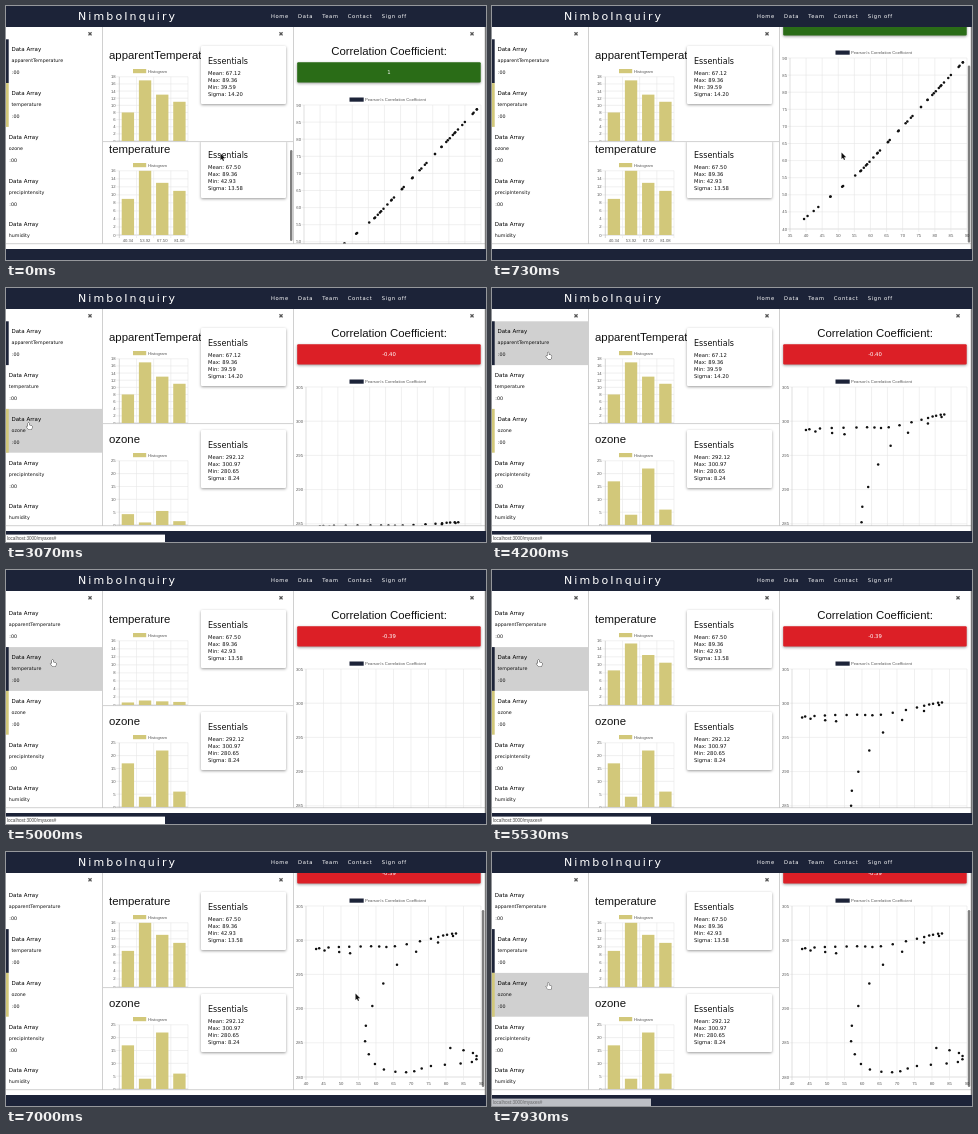
These frames come from a looping animation (480x254 px, 8000 ms). An HTML page with a canvas:

```html
<!DOCTYPE html>
<html lang="en">
<head>
<meta charset="utf-8">
<title>Climate dashboard</title>
<style>
html, body { margin: 0; width: 100%; height: 100%; overflow: hidden; background: #fff; }
canvas { display: block; width: 480px; height: 254px; }
</style>
</head>
<body>
<canvas id="stage"></canvas>
<script>
const LOOP = 8000, W = 480, H = 254;
const NAVY = '#1c2338', KHAKI = '#d2c87a', GREEN = '#2a6c17', RED = '#dc1f26', BORDER = '#c4c4c4';
const WIDE = '"DejaVu Sans", sans-serif', ARIAL = '"Liberation Sans", Arial, sans-serif';
const TOP = 21, BOTTOM = 238, ITEM_TOP = 33.3, ITEM_H = 43.8, CARD_H = 102;

const canvas = document.getElementById('stage');
const ctx = canvas.getContext('2d');
const dpr = window.devicePixelRatio || 1;
canvas.width = W * dpr;
canvas.height = H * dpr;

const items = ['apparentTemperature', 'temperature', 'ozone', 'precipIntensity', 'humidity'];

const series = {
  apparentTemperature: { bars: [8, 17, 13, 11], mean: 67.12, max: 89.36, min: 39.59, sigma: 14.2,
    value: ([t]) => t - 0.25 * Math.max(0, 57 - t) },
  temperature: { bars: [9, 16, 13, 11], mean: 67.5, max: 89.36, min: 42.93, sigma: 13.58,
    value: ([t]) => t },
  ozone: { bars: [17, 4, 22, 6], mean: 292.12, max: 300.97, min: 280.65, sigma: 8.24,
    value: ([, o]) => o }
};

// Every third hour as [temperature, ozone]; the hours between are interpolated
const weather = [
  [52.6, 298.1], [42.9, 298.7], [49.4, 299], [58.6, 299.1], [65.4, 299.1], [75.7, 300.2],
  [80.3, 300.8], [82, 300.6], [66, 296.4], [57.1, 287.5], [59.7, 281.9], [68.6, 280.7],
  [75.7, 281.6], [87.4, 282.2], [87.7, 283.5], [78.5, 284.5]
];
const readings = Array.from({ length: 3 * (weather.length - 1) }, (_, hour) => spline(weather, hour / 3));

const views = [
  { start: 0, cards: ['apparentTemperature', 'temperature'], value: '1', color: GREEN },
  { start: 3002, cards: ['apparentTemperature', 'ozone'], value: '-0.40', color: RED },
  { start: 4983, cards: ['temperature', 'ozone'], value: '-0.39', color: RED }
];

// Moves: start, end, then the values reached
const cursorMoves = [
  [0, 0, 217, 151], [130, 400, 352, 150], [1200, 1530, 188, 200], [1800, 1930, 18, 130],
  [2470, 2800, 23, 138], [3870, 4200, 56.5, 67.5], [4470, 4700, 47, 93],
  [5870, 6130, 352, 145], [7270, 7400, 337, 152], [7600, 7730, 56.5, 134]
];
const scrollMoves = [[0, 0, 0], [330, 730, 47], [2470, 2800, 0], [6130, 6200, 5], [6470, 7000, 45]];

const clamp = v => Math.min(1, Math.max(0, v));
const ramp = (t, a, b) => b > a ? clamp((t - a) / (b - a)) : 1;
const smooth = p => p * p * (3 - 2 * p);
const easeOutQuart = p => 1 - (1 - p) ** 4;

function spline(points, u) {
  const i = Math.floor(u), f = u - i;
  const at = n => points[Math.min(points.length - 1, Math.max(0, n))];
  return [0, 1].map(k => {
    const [a, b, c, d] = [-1, 0, 1, 2].map(n => at(i + n)[k]);
    return b + f / 2 * (c - a + f * (2 * a - 5 * b + 4 * c - d + f * (3 * (b - c) + d - a)));
  });
}

function follow(moves, t) {
  return moves.reduce((now, [a, b, ...goal]) => {
    const p = t < a ? 0 : smooth(ramp(t, a, b));
    return goal.map((v, i) => p === 1 ? v : now[i] + (v - now[i]) * p);
  }, [0, 0]);
}

function rect(x, y, w, h, color) {
  ctx.fillStyle = color;
  ctx.fillRect(x, y, w, h);
}

function line(x1, y1, x2, y2, color = '#e6e6e6', width = 0.6) {
  ctx.strokeStyle = color;
  ctx.lineWidth = width;
  ctx.beginPath();
  ctx.moveTo(x1, y1);
  ctx.lineTo(x2, y2);
  ctx.stroke();
}

function text(str, x, y, size, { font = WIDE, color = '#111', align = 'left', spacing = 0 } = {}) {
  ctx.font = `${size}px ${font}`;
  ctx.letterSpacing = spacing + 'px';
  ctx.fillStyle = color;
  ctx.textAlign = align;
  ctx.fillText(str, x, y);
  return ctx.measureText(str).width;
}

const tickText = (str, x, y, align) => text(str, x, y, 4.2, { font: ARIAL, color: '#555', align });
const closeIcon = x => text('✖', x, 30.2, 6, { align: 'center', color: '#555' });

function clipped(x, y, w, h, dy, draw) {
  ctx.save();
  ctx.beginPath();
  ctx.rect(x, y, w, h);
  ctx.clip();
  ctx.translate(0, dy);
  draw();
  ctx.restore();
}

function shadowBox(x, y, w, h, color) {
  ctx.save();
  ctx.shadowColor = 'rgba(0,0,0,.4)';
  ctx.shadowBlur = 3 * dpr;
  ctx.shadowOffsetY = dpr;
  ctx.fillStyle = color;
  ctx.beginPath();
  ctx.roundRect(x, y, w, h, 1);
  ctx.fill();
  ctx.restore();
}

function thumb(x, y, h, alpha) {
  ctx.fillStyle = `rgba(0,0,0,${0.5 * alpha})`;
  ctx.beginPath();
  ctx.roundRect(x, y, 2.4, h, 1.2);
  ctx.fill();
}

function drawHeader() {
  rect(0, 0, W, TOP, NAVY);
  text('NimboInquiry', 72, 14.3, 11, { color: '#fff', spacing: 2.1 });
  let x = 265;
  for (const name of ['Home', 'Data', 'Team', 'Contact', 'Sign off'])
    x += 9.2 + text(name, x, 12.3, 5.2, { color: '#fff', spacing: 0.65 });
}

function drawList(selected, hovered) {
  closeIcon(84);
  items.forEach((name, i) => {
    const y = ITEM_TOP + i * ITEM_H, slot = selected.indexOf(name);
    if (i === hovered) rect(0, y, 96, ITEM_H, '#d0d0d0');
    if (slot >= 0) rect(0, y, 2.7, ITEM_H, slot ? KHAKI : NAVY);
    const x = slot >= 0 ? 5.5 : 2.8;
    text('Data Array', x, y + 11.8, 5.5, { color: '#000' });
    text(name, x, y + 22.8, 4.75);
    text(':00', x + 0.5, y + 35, 4.75);
  });
}

function drawHistogram({ bars, mean, sigma }, grow) {
  const left = 113.3, right = 182, top = 70.8, base = 135, cat = (right - left) / bars.length;
  const peak = Math.max(...bars), step = peak > 20 ? 5 : 2, max = Math.ceil(peak / step) * step;
  const yOf = v => base - v / max * (base - top);
  rect(127, 63, 13.2, 4.2, KHAKI);
  tickText('Histogram', 142, 66.6);
  for (let v = 0; v <= max; v += step) {
    line(left - 3, yOf(v), right, yOf(v), v ? undefined : '#bbb');
    tickText(v, left - 3.6, yOf(v) + 1.5, 'right');
  }
  for (let i = 0; i <= bars.length; i++)
    line(left + i * cat, top, left + i * cat, base + 3, i ? undefined : '#bbb');
  bars.forEach((v, i) => {
    const x = left + (i + 0.5) * cat, y = yOf(v * grow);
    rect(x - cat * 0.36, y, cat * 0.72, base - y, KHAKI);
    tickText((mean + (i - 2) * sigma).toFixed(2), x, base + 6.6, 'center');
  });
}

function drawCard(name, grow) {
  const data = series[name];
  text(name, 103, 52.6, 11.4, { font: ARIAL });
  drawHistogram(data, grow);
  shadowBox(195, 40, 85, 58, '#fff');
  text('Essentials', 202, 57.8, 8);
  ['Mean', 'Max', 'Min', 'Sigma'].forEach((label, i) =>
    text(`${label}: ${data[label.toLowerCase()].toFixed(2)}`, 202, 69 + i * 7.15, 5.25));
}

function axis({ min, max }, from, to) {
  const low = Math.floor(min / 5) * 5, high = Math.ceil(max / 5) * 5;
  const ticks = [];
  for (let v = low; v <= high; v += 5) ticks.push(v);
  return { low, ticks, at: v => from + (v - low) / (high - low) * (to - from) };
}

function drawScatter([first, second], grow) {
  // The view's two series, hotter measure on the x axis
  const xData = series[first], yData = series[second];
  const left = yData.max > 100 ? 300 : 298, right = 475, top = 99, base = 270;
  const xAxis = axis(xData, left, right), yAxis = axis(yData, base, top);
  rect(343.5, 91.5, 14.2, 4.2, NAVY);
  tickText("Pearson's Correlation Coefficient", 359, 95);
  for (const v of yAxis.ticks) {
    const y = yAxis.at(v);
    line(left - 2.5, y, right, y, v > yAxis.low ? undefined : '#ccc');
    tickText(v, left - 3, y + 1.5, 'right');
  }
  for (const v of xAxis.ticks) {
    const x = xAxis.at(v);
    line(x, top, x, base + 3, v > xAxis.low ? undefined : '#ccc');
    tickText(v, x, base + 7.6, 'center');
  }
  ctx.fillStyle = '#111';
  for (const r of readings) {
    const y = yAxis.at(yData.value(r));
    ctx.beginPath();
    ctx.arc(xAxis.at(xData.value(r)), base + (y - base) * grow, 1.25, 0, 2 * Math.PI);
    ctx.fill();
  }
}

function drawCorrelation({ cards, value, color }, grow) {
  closeIcon(466);
  text('Correlation Coefficient:', 383, 49.2, 11.4, { font: ARIAL, align: 'center' });
  shadowBox(291.2, 56.2, 183.5, 20.3, color);
  text(value, 383, 68.3, 5.3, { color: '#fff', align: 'center' });
  drawScatter(cards, grow);
}

function drawStatus(alpha) {
  ctx.globalAlpha = alpha;
  rect(0, 246.6, 159, 7.4, '#fff');
  text('localhost:3000/myaxes#', 1, 252.2, 4.6, { font: ARIAL, color: '#444' });
  ctx.globalAlpha = 1;
}

const arrowShape = new Path2D('M0 0V6.6L1.5 5.2L2.5 7.4L3.5 7L2.6 4.8H4.7Z');
const handShape = new Path2D('M1.5 .6Q2.2 -.2 2.8 .6V2.8L5 3.2Q5.8 3.5 5.6 4.4L5 7H2L0 4.2Q0 3.4 1.5 4Z');

function drawCursor(x, y, hand) {
  ctx.save();
  ctx.translate(x - 2.5, y - 3.5);
  ctx.lineWidth = 0.7;
  ctx.strokeStyle = hand ? '#111' : '#fff';
  ctx.fillStyle = hand ? '#fff' : '#111';
  const shape = hand ? handShape : arrowShape;
  ctx.stroke(shape);
  ctx.fill(shape);
  ctx.restore();
}

function selectionAt(t) {
  const step = t < 2200 ? 0 : t < 4740 ? 1 : 2;
  return views[step].cards;
}

function draw(t) {
  const step = views.findLastIndex(v => v.start <= t);
  const view = views[step], before = views[step - 1] || view;
  const grow = step ? easeOutQuart(clamp((t - view.start) / 1000)) : 1;
  const [cx, cy] = follow(cursorMoves, t);
  const [scroll] = follow(scrollMoves, t);
  const overList = cx < 96;
  const hovered = overList ? Math.floor((cy - ITEM_TOP) / ITEM_H) : -1;
  const cardScroll = step ? 0 : 8;

  ctx.setTransform(dpr, 0, 0, dpr, 0, 0);
  rect(0, 0, W, H, '#fff');

  clipped(0, TOP, 96, BOTTOM - TOP, 0, () => drawList(selectionAt(t), hovered));
  closeIcon(275);
  view.cards.forEach((name, i) => {
    const top = i ? 136 : 33, bottom = i ? BOTTOM : 135.5;
    clipped(97, top, 190, bottom - top, i * (CARD_H - cardScroll),
      () => drawCard(name, name === before.cards[i] ? 1 : grow));
  });
  clipped(288, TOP, 192, BOTTOM - TOP, -scroll, () => drawCorrelation(view, grow));

  for (const x of [96.5, 287.5]) line(x, TOP, x, BOTTOM, BORDER, 0.8);
  line(97, 135.6, 287, 135.6, BORDER, 0.8);
  line(0, 237.7, W, 237.7, BORDER, 0.8);
  line(479.4, TOP, 479.4, 243, '#777', 1.2);

  thumb(284, 144, 91, 1 - ramp(t, 400, 700));
  const scrollbar = t < 3000
    ? ramp(t, 330, 400) * (1 - ramp(t, 1200, 1500))
    : ramp(t, 6200, 6330) * (1 - ramp(t, 7930, LOOP));
  thumb(475.8, 22 + scroll * 0.8, 177, scrollbar);

  drawHeader();
  rect(0, 243, W, 11, NAVY);
  drawStatus(t < 7000 ? ramp(t, 2050, 2130) * (1 - ramp(t, 5930, 6130)) : ramp(t, 7860, 7960));
  drawCursor(cx, cy, overList);
}

function frame(now) {
  draw(now % LOOP);
  requestAnimationFrame(frame);
}
requestAnimationFrame(frame);
</script>
</body>
</html>
```
